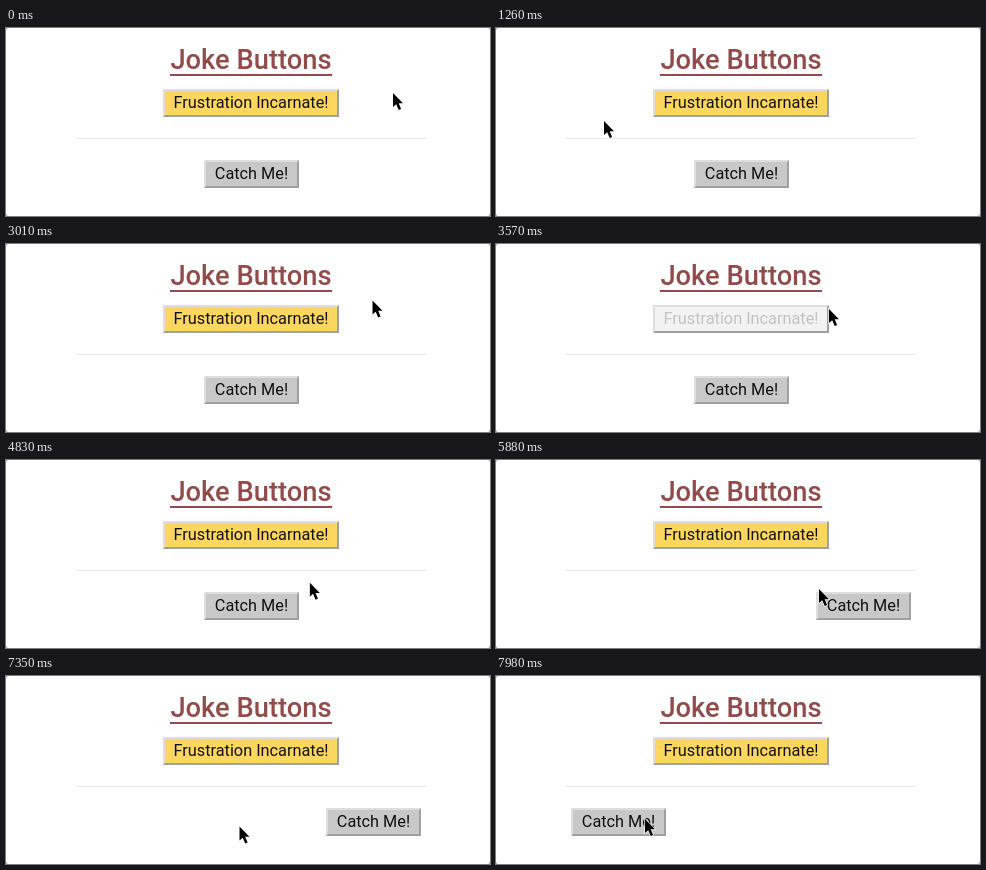
Recreate the animation shown at these times as an HTML page. Size 484 by 188 pixels, loop 8000 ms.

```html
<!DOCTYPE html>
<html lang="en">
<head>
<meta charset="utf-8">
<title>Joke Buttons</title>
<style>
html, body { margin: 0; width: 100%; height: 100%; overflow: hidden; background: #aaa; }
main { position: relative; width: 484px; height: 188px; overflow: hidden; background: #fff; border-radius: 3px; }
main > * { position: absolute; box-sizing: border-box; white-space: nowrap; }
h1 { left: 0; width: 490px; top: 18px; margin: 0; text-align: center; font: 500 27.3px/29px Roboto, sans-serif; color: #904b4a; }
h1 span { display: inline-block; height: 30px; box-sizing: border-box; border-bottom: 2px solid; }
hr { left: 70px; top: 110px; width: 350px; height: 1px; margin: 0; border: 0; background: #e6e6e6; }
.button {
  height: 28px; border: 2px solid; border-color: #dedede #a0a0a0 #a0a0a0 #dedede;
  text-align: center; font: 16.3px/24px Roboto, sans-serif; color: #111;
}
#tease { left: 157px; top: 61px; width: 176px; background: #fcd65f; }
#tease.off { background: #f2f2f2; color: #c2c2c2; }
#runner { top: 132px; width: 95px; background: #c8c8c8; }
svg { left: 0; top: 0; }
</style>
</head>
<body>
<main>
  <h1><span>Joke Buttons</span></h1>
  <div class="button" id="tease">Frustration Incarnate!</div>
  <hr>
  <div class="button" id="runner">Catch Me!</div>
  <svg width="484" height="188">
    <g id="pointer">
      <circle id="ring" cx="1" cy="2" r="19.7" fill="none" stroke="#000" stroke-width="2.8"/>
      <path d="M0 0V14L3.2 11.2L5.7 17L8.1 16L5.7 10.3H10Z" stroke="#fff" stroke-width="1.2" paint-order="stroke"/>
    </g>
  </svg>
</main>
<script>
const LOOP = 8000, STEP = 70;
const [tease, runner, pointer, ring] =
  ["tease", "runner", "pointer", "ring"].map(id => document.getElementById(id));

// Pointer stops: time, x, y
const stops = [
  [0, 387, 65], [490, 240, 80], [980, 240, 80], [1260, 108, 93], [1400, 102, 91],
  [1470, 102, 91], [1960, 238, 73], [2380, 238, 73], [2660, 389, 54], [2940, 389, 54],
  [3220, 245, 70], [3500, 245, 70], [3570, 333, 65], [3780, 414, 54], [4410, 414, 54],
  [4480, 412, 53], [4550, 412, 53], [4970, 266, 147], [5040, 266, 147], [5250, 206, 143],
  [5600, 206, 143], [5880, 323, 129], [6090, 414, 138], [6440, 398, 143], [6860, 109, 150],
  [7000, 40, 158], [7140, 50, 156], [7560, 417, 145], [7700, 408, 143], [7770, 408, 143],
  [7980, 149, 143], [LOOP, 149, 143]
];
// Left edge of the fleeing button from each time on
const jumps = [[0, 198], [5670, 320], [5950, 75], [6790, 320], [7420, 75]];
const clicks = [[2240, 2310], [5320, 5460]];

function pointerAt(t) {
  const i = stops.findIndex(s => s[0] > t);
  const [t0, x0, y0] = stops[i - 1], [t1, x1, y1] = stops[i];
  const u = (t - t0) / (t1 - t0), e = u * u * (3 - 2 * u);
  return [x0 + (x1 - x0) * e, y0 + (y1 - y0) * e];
}

function draw(now) {
  const t = Math.floor(now % LOOP / STEP) * STEP;
  const [x, y] = pointerAt(t);
  pointer.setAttribute("transform", `translate(${x} ${y})`);
  tease.classList.toggle("off", x >= 157 && x <= 333 && y >= 61 && y <= 89);
  runner.style.left = jumps.findLast(j => j[0] <= t)[1] + "px";
  ring.style.display = clicks.some(([a, b]) => t >= a && t < b) ? "" : "none";
}

const start = performance.now();
function tick() {
  draw(performance.now() - start);
  requestAnimationFrame(tick);
}
tick();
</script>
</body>
</html>
```
